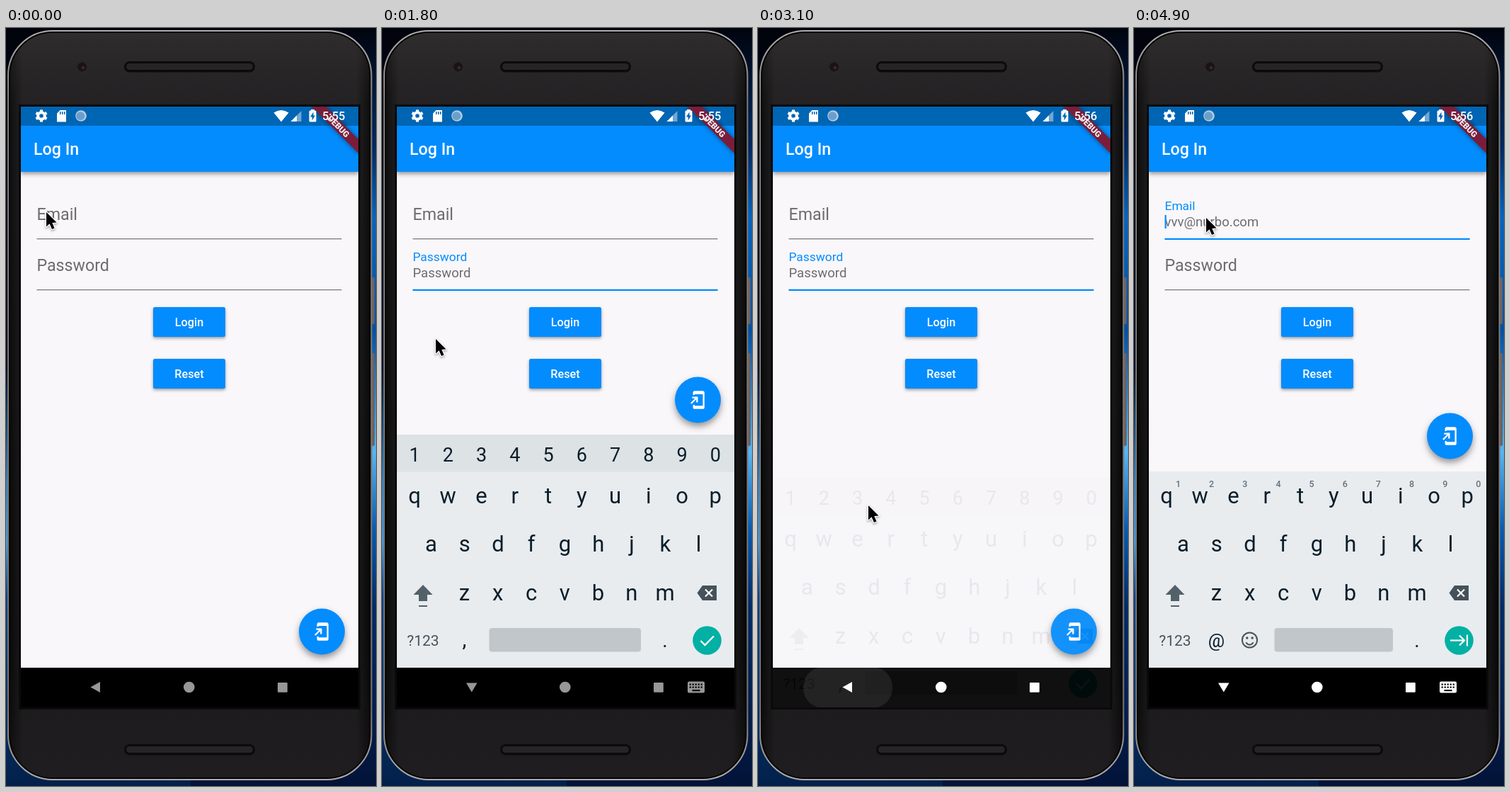
An HTML page with a canvas for the animation above (5000 ms loop, 523 by 1070 pixels).

```html
<!DOCTYPE html>
<html lang="en">
<head>
<meta charset="utf-8">
<title>Log In</title>
<style>
html, body { margin: 0; width: 523px; height: 1070px; overflow: hidden; background: #000; }
canvas { display: block; }
</style>
</head>
<body>
<canvas id="stage" width="523" height="1070"></canvas>
<script>
const stage = document.getElementById('stage').getContext('2d');
const layer = new OffscreenCanvas(523, 1070).getContext('2d');
let ctx = stage;
const BLUE = '#038cfe', INK = '#0b1d29', GREY = '#6c6c6e';
const LOOP = 5000, STEP = 100;
const SCREEN = { x: 21, y: 111, w: 477, h: 848 };
const FOCUS = { email: 300, password: 1300, emailAgain: 3900 };
const HIDE = 2960;
const POINTER = [ // time, x, y
  [0, 57, 260], [500, 57, 260], [1000, 68, 329], [1300, 68, 329], [1800, 76, 439], [2400, 128, 908],
  [2850, 128, 908], [3100, 156, 674], [3700, 102, 268], [5000, 102, 268]
];
const homeIcon = new Path2D('M18 1 8 1C6.9 1 6 1.9 6 3V6H8V5H18V19H8V18H6V21C6 22.1 6.9 23 8 23H18C19.1 23 20 22.1 20 21V3C20 1.9 19.1 1 18 1ZM10 15H12V8H5V10H8.6L3 15.6 4.4 17 10 11.4Z');

const clamp = v => Math.max(0, Math.min(1, v));
const ease = v => v * v * (3 - 2 * v);

function rect(x, y, w, h, color, r = 0) {
  ctx.fillStyle = color;
  ctx.beginPath();
  ctx.roundRect(x, y, w, h, r);
  ctx.fill();
}
function circle(x, y, r, color) {
  ctx.fillStyle = color;
  ctx.beginPath();
  ctx.arc(x, y, r, 0, 7);
  ctx.fill();
}
function trace(points, closed) {
  ctx.beginPath();
  points.forEach(([x, y]) => ctx.lineTo(x, y));
  if (closed) ctx.closePath();
}
function poly(points, color) {
  trace(points, true);
  ctx.fillStyle = color;
  ctx.fill();
}
function line(points, color, width) {
  trace(points);
  ctx.strokeStyle = color;
  ctx.lineWidth = width;
  ctx.stroke();
}
function text(str, x, y, size, color, weight = 400, align = 'left') {
  ctx.font = `${weight} ${size}px Roboto, sans-serif`;
  ctx.textAlign = align;
  ctx.fillStyle = color;
  ctx.fillText(str, x, y);
}
function shadow(color, blur, dy) {
  ctx.shadowColor = color;
  ctx.shadowBlur = blur;
  ctx.shadowOffsetY = dy;
}
const noShadow = () => shadow('transparent', 0, 0);
function withAlpha(a, draw) {
  ctx.save();
  ctx.globalAlpha *= a;
  draw();
  ctx.restore();
}
function gradient(x0, y0, x1, y1, stops) {
  const g = ctx.createLinearGradient(x0, y0, x1, y1);
  stops.forEach(([at, color]) => g.addColorStop(at, color));
  return g;
}

function phone() {
  rect(0, 0, 261, 1070, gradient(0, 0, 0, 1070,
    [[0, '#01030c'], [.45, '#010f26'], [.6, '#2f7fc4'], [.68, '#3f9adf'], [.75, '#0a418a'], [1, '#03204a']]));
  rect(261, 0, 262, 1070, gradient(0, 0, 0, 1070,
    [[0, '#01040e'], [.16, '#012a62'], [.25, '#0765bd'], [.4, '#08519f'], [.56, '#58b4ee'], [.66, '#0a5cb0'], [.76, '#022c66'], [1, '#031338']]));
  rect(515, 352, 6, 66, '#6c625f', 2);
  rect(515, 459, 6, 131, '#6c625f', 2);
  rect(3, 4, 513.5, 1057, '#050505', 63);
  ctx.strokeStyle = gradient(0, 0, 0, 1070, [[0, '#b2b0b0'], [.1, '#827d7b'], [.9, '#7a7675'], [1, '#b2b0b0']]);
  ctx.lineWidth = 2;
  ctx.stroke();
  rect(6, 7, 507.5, 1051, gradient(6, 0, 513, 0,
    [[0, '#070707'], [.035, '#201e20'], [.965, '#201e20'], [1, '#070707']]), 60);
  rect(6, 7, 507.5, 1051, gradient(0, 7, 0, 1058,
    [[0, 'rgba(62,58,58,.5)'], [.1, 'rgba(45,43,44,.25)'], [.8, 'rgba(20,20,20,.2)'], [1, 'rgba(30,28,30,.5)']]), 60);
  rect(18, 108, 483, 854, '#0a0a0a');
  for (const y of [47, 1011]) {
    rect(167, y, 185, 15.5, '#0b0b0b', 8);
    rect(170, y + 3, 179, 9, '#262425', 5);
  }
  circle(107.5, 55, 6.5, '#171516');
  circle(109, 56, 2.2, '#4a2326');
}

function statusIcons(t) {
  ctx.strokeStyle = '#fff';
  ctx.lineWidth = 4;
  ctx.beginPath();
  ctx.arc(50, 124, 4.8, 0, 7);
  ctx.stroke();
  for (let i = 0; i < 6; i++) {
    const a = i * Math.PI / 3 + Math.PI / 6, c = Math.cos(a), s = Math.sin(a);
    line([[50 + 5 * c, 124 + 5 * s], [50 + 8.6 * c, 124 + 8.6 * s]], '#fff', 4);
  }
  poly([[76.5, 116], [85, 116], [85, 132.5], [72, 132.5], [72, 120.5]], '#fff');
  for (const x of [76, 79, 82]) rect(x, 118, 1.5, 4, '#0065b3');
  circle(106, 124, 7.8, '#b3cde3');
  circle(105.3, 124.3, 6, '#6b9fca');

  ctx.fillStyle = '#fff';
  ctx.beginPath();
  ctx.moveTo(378.5, 119.5);
  ctx.quadraticCurveTo(389, 112.5, 399.5, 119.5);
  ctx.lineTo(389, 132.5);
  ctx.fill();
  poly([[417.5, 117], [417.5, 132], [402.5, 132]], '#71a7d2');
  poly([[411, 123.5], [411, 132], [402.5, 132]], '#fff');
  rect(431, 115, 5, 3, '#fff');
  rect(428.5, 116.5, 10, 16, '#fff', 1.5);
  poly([[434.5, 118.5], [434.5, 123.5], [437, 123.5], [432.7, 130.5], [432.7, 125.5], [430, 125.5]], '#0065b3');
  text(t < 2200 ? '5:55' : '5:56', 447, 130, 16.4, '#fff', 500);
}

function banner() {
  ctx.save();
  ctx.translate(498, 111);
  ctx.rotate(Math.PI / 4);
  shadow('rgba(0,0,0,.5)', 7, 0);
  rect(-46.5, 32.5, 93, 14, '#7b1d3a');
  noShadow();
  text('DEBUG', 0, 43.6, 11.8, '#f4eef1', 900, 'center');
  ctx.restore();
}

// p is how far the field has moved into its focused look.
function field(label, hint, dy, p, caret) {
  const y = 271 + dy;
  text(label, 43.5, y - 14 * p, 23.19 * (1 - p / 4), p > .5 ? BLUE : GREY);
  withAlpha(p, () => text(hint, 43.5, y + 8.7, 18.55, GREY));
  rect(43.5, 297 + dy, 431, 1.2, '#777779');
  if (p) withAlpha(p, () => rect(43.5, 296.8 + dy, 431, 2.2, BLUE));
  if (caret) rect(43.5, 264 + dy, 2.2, 19, BLUE);
}

function button(label, y) {
  shadow('rgba(0,0,0,.38)', 4, 2);
  rect(208, y, 102, 42, BLUE, 2.5);
  noShadow();
  text(label, 259, y + 27, 16.23, '#fff', 500, 'center');
}

function fab(y) {
  shadow('rgba(0,0,0,.4)', 10, 5);
  circle(446.5, y, 32.5, BLUE);
  noShadow();
  ctx.save();
  ctx.translate(432.6, y - 13.9);
  ctx.scale(1.16, 1.16);
  ctx.fillStyle = '#fff';
  ctx.fill(homeIcon);
  ctx.restore();
}

function keyRow(keys, x, y, size) {
  [...keys].forEach((k, i) => text(k, x + i * 47.25, y, size, INK, 400, 'center'));
}

function keyboard(isEmail) {
  const top = isEmail ? 626 : 574;
  rect(21, top, 477, 903 - top, '#e8ecef');
  if (isEmail) {
    [...'1234567890'].forEach((k, i) => text(k, 62.5 + i * 47.15, 647.5, 12.5, '#65717a', 500, 'center'));
  } else {
    rect(21, 574, 477, 52.5, '#dde2e5');
    keyRow('1234567890', 46, 612, 27);
  }
  keyRow('qwertyuiop', 46, 671, 31);
  keyRow('asdfghjkl', 69.5, 739, 31);
  keyRow('zxcvbnm', 116.5, 807.5, 31);

  poly([[58, 786], [71.5, 800], [64, 800], [64, 809], [52, 809], [52, 800], [44.5, 800]], '#546069');
  rect(52, 815, 12, 2, '#546069');
  poly([[445.5, 797.5], [453, 787], [473, 787], [473, 808], [453, 808]], '#45525b');
  line([[457, 792.5], [467, 802.5]], '#fff', 2.2);
  line([[467, 792.5], [457, 802.5]], '#fff', 2.2);

  text('?123', 58, 872, 21, '#46535c', 400, 'center');
  if (isEmail) {
    text('@', 116.5, 874, 26, INK, 400, 'center');
    ctx.strokeStyle = '#46535c';
    ctx.lineWidth = 2;
    ctx.beginPath();
    ctx.arc(163.5, 864, 10.6, 0, 7);
    ctx.stroke();
    ctx.beginPath();
    ctx.arc(163.5, 865, 5.5, .4, Math.PI - .4);
    ctx.stroke();
    circle(159.8, 861, 1.7, '#46535c');
    circle(167.2, 861, 1.7, '#46535c');
  } else {
    text(',', 116.5, 873, 30, INK, 400, 'center');
  }
  const left = isEmail ? 198.5 : 151.5;
  rect(left, 847, 366 - left, 33.5, '#c0c6ca', 4);
  text('.', 400, 874, 28, INK, 400, 'center');
  circle(459.5, 864.5, 20.3, '#02b0a4');
  if (isEmail) {
    line([[447, 864.5], [466, 864.5]], '#fff', 2.2);
    line([[460, 857.5], [467, 864.5], [460, 871.5]], '#fff', 2.2);
    line([[471, 856.5], [471, 872.5]], '#fff', 2.2);
  } else {
    line([[450.5, 865], [456.5, 871], [469, 858.5]], '#fff', 2.3);
  }
}

// The keyboard fades as one flat picture, so its keys never add up with its ground.
function fadeKeyboard(isEmail, alpha, slide) {
  ctx = layer;
  ctx.clearRect(0, 0, 523, 1070);
  keyboard(isEmail);
  ctx = stage;
  withAlpha(alpha, () => ctx.drawImage(layer.canvas, 0, Math.round(slide)));
}

function navIcons(t, open) {
  const color = t >= 2900 ? '#fff' : '#979797';
  const ripple = clamp((t - 2750) / 150) * clamp((3500 - t) / 350);
  withAlpha(ripple, () => rect(64, 902, 126, 58, 'rgba(255,255,255,.08)', 28));
  poly(open ? [[119, 924.5], [134.5, 924.5], [126.8, 937.5]] : [[133, 923], [133, 938], [119.5, 930.5]], color);
  circle(258.8, 930.5, 7.8, color);
  rect(384, 924, 13.8, 13.8, color, 1);
  if (!open) return;
  rect(432, 922.5, 24, 16, color, 2);
  for (let i = 0; i < 5; i++) {
    rect(434.6 + i * 4, 925.5, 2.2, 2.2, '#000');
    rect(434.6 + i * 4, 929.5, 2.2, 2.2, '#000');
  }
  rect(438.5, 934, 11, 2.2, '#000');
}

function pointer(t) {
  const i = POINTER.findIndex(p => p[0] > t);
  const [t0, x0, y0] = POINTER[i - 1], [t1, x1, y1] = POINTER[i];
  const p = ease((t - t0) / (t1 - t0));
  ctx.save();
  ctx.translate(x0 + (x1 - x0) * p, y0 + (y1 - y0) * p);
  trace([[0, 0], [0, 20.5], [4.6, 16.2], [8, 24], [11.6, 22.4], [8.3, 14.9], [14.6, 14.5]], true);
  ctx.lineJoin = 'round';
  ctx.strokeStyle = '#fff';
  ctx.lineWidth = 2.6;
  shadow('rgba(0,0,0,.35)', 3, 1.5);
  ctx.stroke();
  noShadow();
  ctx.fillStyle = '#000';
  ctx.fill();
  ctx.restore();
}

function render(t) {
  const moved = at => ease(clamp((t - at) / 200));
  const shown = at => clamp((t - at - 100) / 145);
  const emailFocus = moved(FOCUS.email) - moved(FOCUS.password) + moved(FOCUS.emailAgain);
  const passFocus = moved(FOCUS.password) - moved(FOCUS.emailAgain);
  const onPassword = t >= FOCUS.password && t < FOCUS.emailAgain;
  const start = onPassword ? FOCUS.password : t < FOCUS.password ? FOCUS.email : FOCUS.emailAgain;
  const blink = t >= start && (t - start) % 1000 < 500;

  const hiding = clamp((t - HIDE) / 150);
  const again = t >= FOCUS.emailAgain;
  const alpha = again ? shown(FOCUS.emailAgain) : shown(FOCUS.email) * (1 - hiding);
  const slide = hiding && !again ? 65 * hiding : 95 * (1 - alpha);
  const open = alpha > 0 && (again || !hiding);
  const emailKeys = t < FOCUS.password + 100 || again;

  phone();
  ctx.save();
  ctx.beginPath();
  ctx.rect(SCREEN.x, SCREEN.y, SCREEN.w, SCREEN.h);
  ctx.clip();
  rect(21, 111, 477, 792, '#f9f7fa');
  field('Email', 'vvv@nurbo.com', 0, emailFocus, blink && !onPassword);
  field('Password', 'Password', 72, passFocus, blink && onPassword);
  button('Login', 394);
  button('Reset', 467);
  fab(!open ? 852 : emailKeys ? 576 : 525);
  shadow('rgba(0,0,0,.4)', 6, 3);
  rect(21, 111, 477, 92, BLUE);
  noShadow();
  rect(21, 111, 477, 27, '#0065b3');
  text('Log In', 39, 179, 23.19, '#fff', 500);
  banner();
  statusIcons(t);
  rect(21, 903, 477, 56, '#000');
  if (alpha) fadeKeyboard(emailKeys, alpha, slide);
  navIcons(t, open);
  ctx.restore();
  pointer(t);
}

function tick() {
  const t = performance.now() % LOOP;
  render(Math.floor(t / STEP) * STEP);
  requestAnimationFrame(tick);
}
tick();
</script>
</body>
</html>
```
